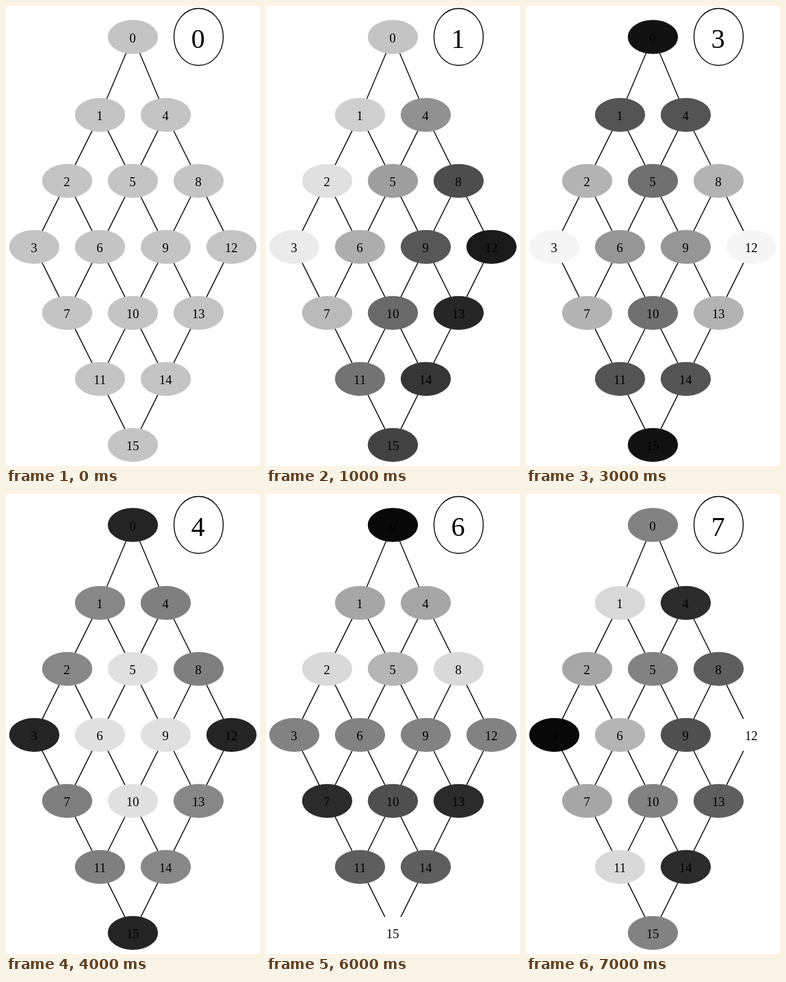
Write an HTML page that moves like this. It is 371 px wide and 669 px high and loops after 8 s.

```html
<!DOCTYPE html>
<html lang="en">
<head>
<meta charset="utf-8">
<title>Grid graph eigenvectors</title>
<style>
html, body { margin: 0; width: 100%; height: 100%; overflow: hidden; background: #fff; }
svg { display: block; width: 371px; height: 669px; }
text { font-family: "Liberation Serif", "Times New Roman", serif; text-anchor: middle; fill: #000; }
</style>
</head>
<body>
<svg id="stage" viewBox="0 0 371 669" stroke-width="1.333"></svg>
<script>
const stage = document.getElementById("stage");
const N = 4, STEP = 1000;

function add(tag, attrs, label) {
  const el = document.createElementNS("http://www.w3.org/2000/svg", tag);
  for (const key in attrs) el.setAttribute(key, attrs[key]);
  if (label !== undefined) el.textContent = label;
  return stage.appendChild(el);
}

// Eigenvectors of the path with four nodes
const u = k => Math.cos(Math.PI * (k + 0.5) / N);
const w = k => (k === 0 || k === N - 1 ? 1 : -1);

// Modes of the 4 x 4 grid Laplacian, in percent of white around MID
const MID = 51.3, SCALE = 104.5;
const modes = [
  () => SCALE / 4,
  (r, c) => 36 * u(r) - 8.3 * u(c),
  (r, c) => -8.3 * u(r) - 36 * u(c),
  (r, c) => -SCALE / 2 * u(r) * u(c),
  (r, c) => -17.8 * w(r) - 19.1 * w(c),
  (r, c) => -19.1 * w(r) + 17.8 * w(c),
  (r, c) => -SCALE / 4 * (u(r) * w(c) + w(r) * u(c)),
  (r, c) => -SCALE / 4 * (u(r) * w(c) - w(r) * u(c))
];

function shade(mode, r, c) {
  const pct = Math.min(100, Math.max(0, Math.round(MID + modes[mode](r, c))));
  const v = Math.round(pct * 2.55);
  return `rgb(${v},${v},${v})`;
}

const nodes = [];
for (let i = 0; i < N * N; i++) {
  const r = Math.floor(i / N), c = i % N, d = r + c;
  nodes.push({ r, c, x: 185.33 + 48 * (r - c), y: d ? 62.33 + 96 * d : 45 });
}

function link(a, b) {
  add("line", { x1: a.x, y1: a.y, x2: b.x, y2: b.y, stroke: "#000" });
}
nodes.forEach((n, i) => {
  if (n.c < N - 1) link(n, nodes[i + 1]);
  if (n.r < N - 1) link(n, nodes[i + N]);
});
nodes.forEach((n, i) => {
  n.el = add("ellipse", { cx: n.x, cy: n.y, rx: 36, ry: 24 });
  add("text", { x: n.x - 0.3, y: n.y + 7.9, "font-size": 18.67 }, i);
});

add("ellipse", { cx: 281.33, cy: 45, rx: 36, ry: 41.5, fill: "#fff", stroke: "#000" });
const counter = add("text", { x: 280.6, y: 61, "font-size": 40 });

let shown = -1;
function draw(time) {
  const mode = Math.floor(time / STEP) % modes.length;
  if (mode === shown) return;
  shown = mode;
  counter.textContent = mode;
  for (const n of nodes) {
    const color = shade(mode, n.r, n.c);
    n.el.setAttribute("fill", color);
    n.el.setAttribute("stroke", color);
  }
}

let start;
function tick(now) {
  if (start === undefined) start = now;
  draw(Math.max(0, now - start));
  requestAnimationFrame(tick);
}
draw(0);
requestAnimationFrame(tick);
</script>
</body>
</html>
```
